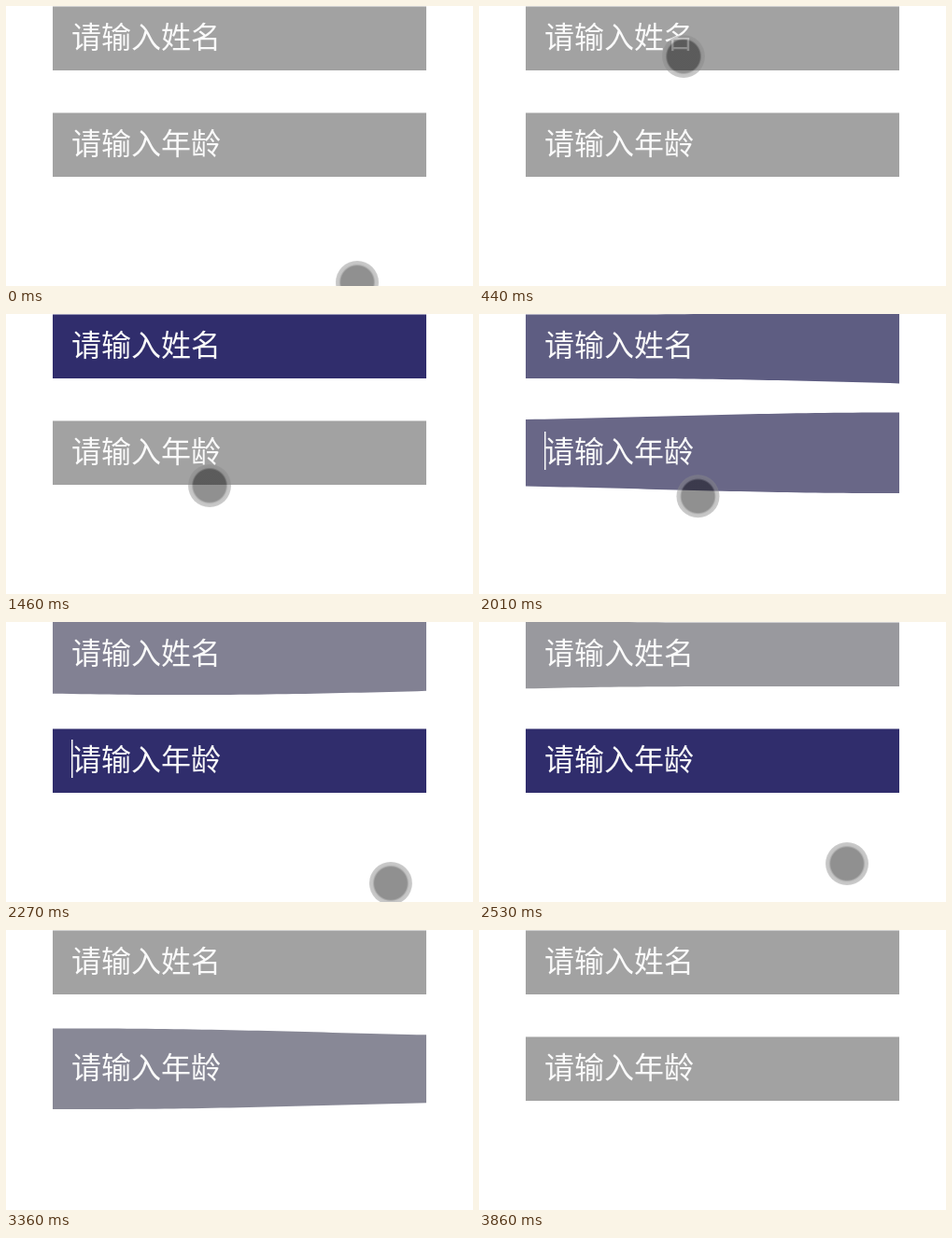
Write an HTML page with a canvas that moves like this. It is 500x300 px and loops after 4.05 s.

```html
<!DOCTYPE html>
<html lang="zh-CN">
<head>
<meta charset="utf-8">
<title>Input wave</title>
<style>
html, body { margin: 0; width: 100%; height: 100%; overflow: hidden; background: #fff; }
canvas { display: block; width: 500px; height: 300px; }
</style>
</head>
<body>
<canvas id="stage" width="500" height="300"></canvas>
<script>
const ctx = document.getElementById('stage').getContext('2d');
const LOOP = 4050;
const LEFT = 50, RIGHT = 450, BAR_HEIGHT = 68.6;
const IDLE = [162, 162, 162], ACTIVE = [48, 45, 108];
const WAVE = { height: 9, reach: 540, from: -490, to: 990 };

const fields = [
  { y: 0.5, label: '请输入姓名', focus: 640, blur: 1765 },
  { y: 114.5, label: '请输入年龄', focus: 1770, blur: 2800 }
];

// Pointer stops: time, x, y
const pointerPath = [
  [0, 376, 296], [60, 376, 296], [250, 290, 165], [440, 219, 54],
  [630, 219, 54], [880, 219, 93], [1070, 219, 250], [1200, 219, 250],
  [1460, 218, 184], [1690, 219, 158], [1790, 219, 160], [2010, 234, 195],
  [2080, 265, 219], [2150, 308, 245], [2270, 412, 280], [2530, 394, 259],
  [2860, 394, 262], [3060, 455, 290], [3200, 461, 330], [LOOP, 461, 330]
];

const clamp = v => Math.max(0, Math.min(1, v));
const mix = (a, b, k) => a + (b - a) * k;

function pointerAt(t) {
  const i = pointerPath.findIndex(p => p[0] > t);
  const a = pointerPath[i - 1], b = pointerPath[i];
  const k = (t - a[0]) / (b[0] - a[0]);
  return [mix(a[1], b[1], k), mix(a[2], b[2], k)];
}

// Focus fills quickly left to right; blur drains slowly right to left.
function fieldState(field, t) {
  if (t < field.blur) {
    return {
      tint: clamp((t - field.focus - 20) / 440),
      crest: mix(WAVE.from, WAVE.to, clamp((t - field.focus) / 380))
    };
  }
  const left = 1 - clamp((t - field.blur) / 1070);
  return {
    tint: left * left,
    crest: mix(WAVE.to, WAVE.from, clamp((t - field.blur - 90) / 770))
  };
}

function bulge(x, crest) {
  const d = Math.min(1, Math.abs(x - crest) / WAVE.reach);
  return WAVE.height * Math.cos(d * Math.PI / 2) ** 2;
}

function drawField(field, t) {
  const { tint, crest } = fieldState(field, t);
  const color = IDLE.map((c, i) => Math.round(mix(c, ACTIVE[i], tint)));
  ctx.fillStyle = `rgb(${color})`;
  ctx.beginPath();
  for (let x = LEFT; x <= RIGHT; x += 10) ctx.lineTo(x, field.y - bulge(x, crest));
  for (let x = RIGHT; x >= LEFT; x -= 10) ctx.lineTo(x, field.y + BAR_HEIGHT + bulge(x, crest));
  ctx.fill();

  ctx.fillStyle = '#fafafa';
  ctx.fillText(field.label, 70, field.y + 44.5);

  const age = t - field.focus;
  if (age >= 0 && t < field.blur && age < 560) {
    ctx.fillRect(70, field.y + 11.5, 1.5, 41);
  }
}

function disc(x, y, radius, color) {
  ctx.fillStyle = color;
  ctx.beginPath();
  ctx.arc(x, y, radius, 0, Math.PI * 2);
  ctx.fill();
}

function drawPointer(t) {
  const [x, y] = pointerAt(t);
  const shade = ctx.createRadialGradient(x, y, 0, x, y, 23);
  shade.addColorStop(0, 'rgba(0,0,0,.435)');
  shade.addColorStop(0.75, 'rgba(0,0,0,.435)');
  shade.addColorStop(0.84, 'rgba(130,130,130,.48)');
  shade.addColorStop(1, 'rgba(140,140,140,.45)');
  disc(x, y, 23, shade);
}

function draw(now) {
  const t = now % LOOP;
  ctx.fillStyle = '#fff';
  ctx.fillRect(0, 0, 500, 300);
  ctx.font = '300 32px "Noto Sans CJK SC", "Noto Sans CJK", sans-serif';
  fields.forEach(field => drawField(field, t));
  drawPointer(t);
}

const start = performance.now();
function tick() {
  draw(performance.now() - start);
  requestAnimationFrame(tick);
}
tick();
</script>
</body>
</html>
```
